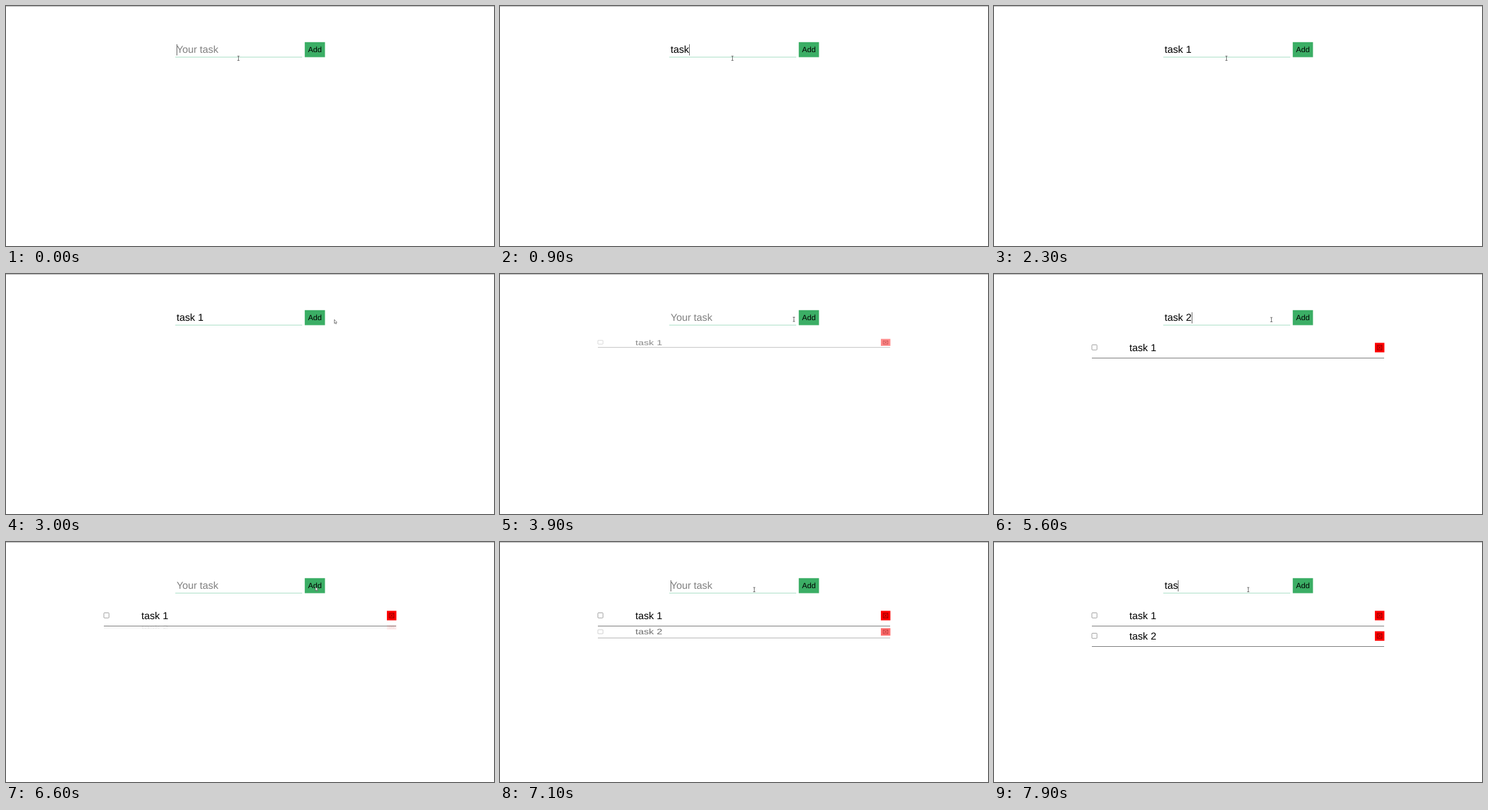
Write an HTML page with a canvas that moves like this. It is 738x364 px and loops after 8000 ms.

```html
<!DOCTYPE html>
<html lang="en">
<head>
<meta charset="utf-8">
<title>Task list</title>
<style>
  html, body { margin: 0; width: 100%; height: 100%; overflow: hidden; background: #fff; }
  canvas { display: block; }
</style>
</head>
<body>
<canvas id="stage" width="738" height="364"></canvas>
<script>
const ctx = document.getElementById('stage').getContext('2d');
ctx.textRendering = 'geometricPrecision';

const LOOP = 8000, STEP = 100;
const KEY_GAP = 170, BLINK = 500, BLUR_LEAD = 500, MOVE = 400, REVEAL = 1000;
const FONT = '"Liberation Sans", Arial, sans-serif';
const TEXT_SIZE = 15.25;
const FIELD = { x: 256, right: 448, line: 77, textX: 258, baseline: 71.3 };
const LIST = { x: 148, width: 442, top: 97, row: 31 };

// Each session types its bursts at an even pace, then submits them as a task.
const sessions = [
  { focus: 0, submit: 3440, bursts: [[200, 't'], [560, 'ask'], [1530, ' 1']] },
  { focus: 4150, submit: 6530, bursts: [[4660, 'task 2']] },
  { focus: 6950, submit: Infinity, bursts: [[7530, 'tas']] }
];

// The pointer eases to each stop in turn.
const home = { x: 351, y: 79 };
const stops = [
  { at: 2600, x: 496.5, y: 69 },
  { at: 3150, x: 469, y: 68 },
  { at: 3700, x: 419, y: 69 },
  { at: 5830, x: 468, y: 68 },
  { at: 6650, x: 384, y: 72 }
];

const clamp = p => Math.max(0, Math.min(1, p));
const smooth = p => p * p * (3 - 2 * p);
const mix = (a, b, p) => a + (b - a) * p;

function rect(x, y, w, h, color) {
  ctx.fillStyle = color;
  ctx.fillRect(x, y, w, h);
}

function text(str, x, y, size, color) {
  ctx.font = `${size}px ${FONT}`;
  ctx.fillStyle = color;
  ctx.fillText(str, x, y);
}

function strokeLines(lines, color, width) {
  ctx.beginPath();
  for (const [x1, y1, x2, y2] of lines) {
    ctx.moveTo(x1, y1);
    ctx.lineTo(x2, y2);
  }
  ctx.strokeStyle = color;
  ctx.lineWidth = width;
  ctx.stroke();
}

function typedAt(session, t) {
  let value = '', lastInput = session.focus;
  for (const [start, keys] of session.bursts) {
    [...keys].forEach((key, i) => {
      const time = start + i * KEY_GAP;
      if (time > t) return;
      value += key;
      lastInput = time;
    });
  }
  return { value, lastInput };
}

function drawForm(t) {
  const session = sessions.find(s => t < s.submit);
  const { value, lastInput } = typedAt(session, t);
  text(value || 'Your task', FIELD.textX, FIELD.baseline, TEXT_SIZE, value ? '#000' : '#808080');

  const focused = t >= session.focus && t < session.submit - BLUR_LEAD;
  if (focused && (t - lastInput) % (2 * BLINK) < BLINK) {
    const width = value ? ctx.measureText(value).width : 0;
    rect(FIELD.textX + Math.round(width), 58, 1, 17, '#666');
  }

  rect(FIELD.x, FIELD.line, FIELD.right - FIELD.x, 1, '#ace0c8');
  rect(451.8, 54.8, 30.6, 22.8, '#3bae65');
  text('Add', 456.7, 70.4, 11.6, '#000');
}

function drawCheckbox() {
  ctx.beginPath();
  ctx.roundRect(LIST.x, -4.2, 7.8, 7.8, 1);
  ctx.strokeStyle = '#8a8a8a';
  ctx.lineWidth = 0.8;
  ctx.stroke();
}

function drawDelete() {
  const r = 3.5, c = 2.3;
  ctx.save();
  ctx.translate(583.2, 0);
  rect(-7.2, -7.2, 14.4, 14.4, '#f00');
  ctx.strokeStyle = '#700';
  ctx.lineWidth = 0.8;
  ctx.strokeRect(-r, -r, 2 * r, 2 * r);
  strokeLines([[-c, -c, c, c], [c, -c, -c, c]], '#700', 0.8);
  ctx.restore();
}

function drawItem(session, index, t) {
  const p = clamp((t - session.submit) / REVEAL);
  if (!p) return;
  const top = LIST.top + index * LIST.row;
  const label = session.bursts.map(([, keys]) => keys).join('');
  ctx.save();
  ctx.globalAlpha = p;
  rect(LIST.x, top + (LIST.row - 1) * p, LIST.width, 1, '#7c7c7c');

  // The row opens from nothing while its content grows from half height.
  ctx.translate(0, top + 14.6 * p);
  ctx.scale(1, mix(0.5, 1, p));
  drawCheckbox();
  text(label, 204.7, 5.2, TEXT_SIZE, '#000');
  drawDelete();
  ctx.restore();
}

function pointerAt(t) {
  return stops.reduce((from, stop) => {
    const p = smooth(clamp((t - stop.at) / MOVE));
    return { x: mix(from.x, stop.x, p), y: mix(from.y, stop.y, p) };
  }, home);
}

function drawBeam() {
  strokeLines([[0.5, -3, 0.5, 3.5], [-1.2, -3, 2.2, -3], [-1.2, 3.5, 2.2, 3.5]], '#555', 0.8);
}

function drawArrow() {
  const shape = new Path2D('M0 0V6L1.4 4.8L2.3 6.8L3.2 6.4L2.3 4.4L4 4.3Z');
  ctx.fillStyle = '#fff';
  ctx.fill(shape);
  ctx.strokeStyle = '#555';
  ctx.lineWidth = 0.7;
  ctx.stroke(shape);
}

function drawPointer(t) {
  const { x, y } = pointerAt(t);
  ctx.save();
  ctx.translate(x, y);
  if (x < FIELD.right) drawBeam();
  else drawArrow();
  ctx.restore();
}

function draw(t) {
  rect(0, 0, 738, 364, '#fff');
  rect(0, 0, 738, 1, '#b4b4b4');
  drawForm(t);
  sessions.forEach((session, i) => drawItem(session, i, t));
  drawPointer(t);
}

let origin;
function tick(now) {
  origin ??= now;
  const t = (now - origin) % LOOP;
  draw(Math.floor(t / STEP) * STEP);
  requestAnimationFrame(tick);
}
draw(0);
requestAnimationFrame(tick);
</script>
</body>
</html>
```
